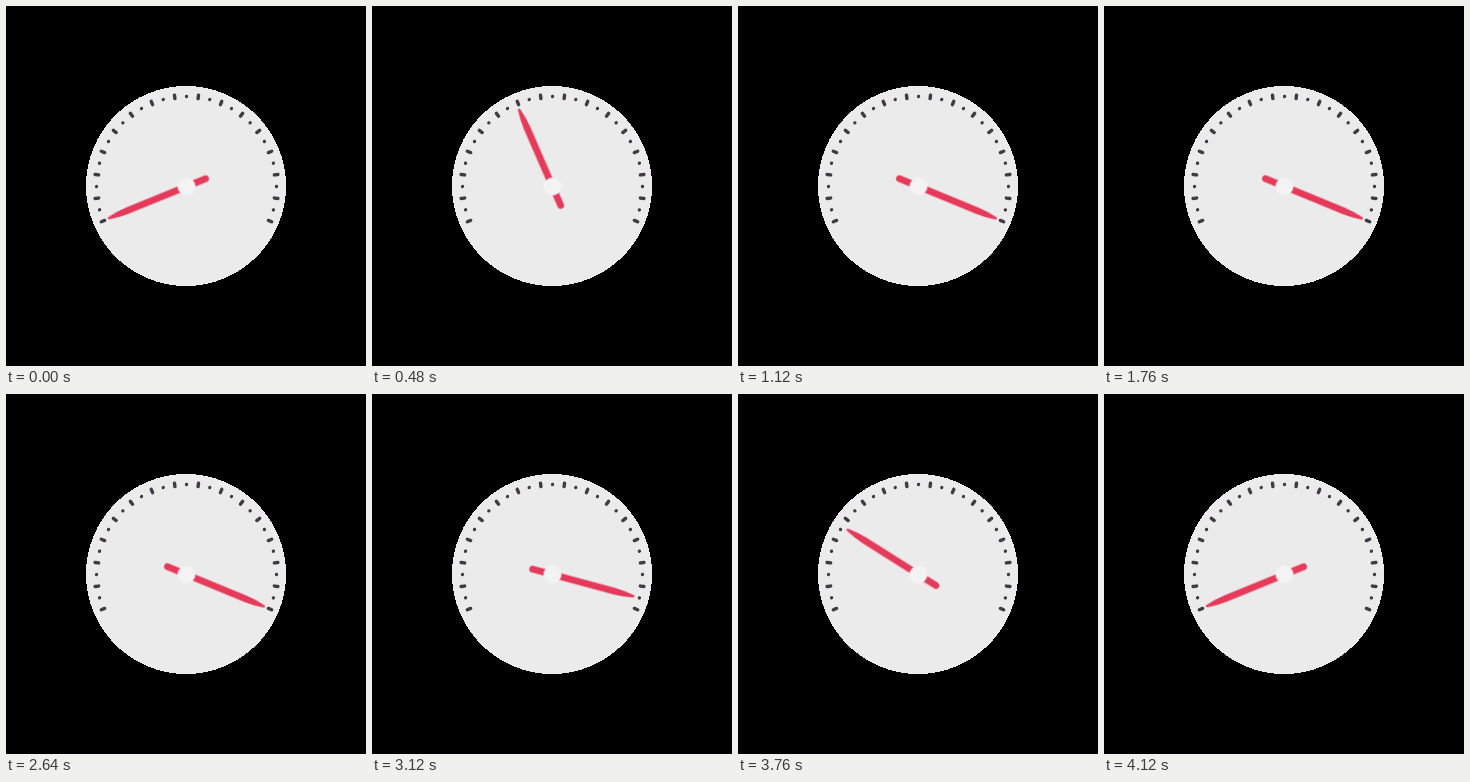
An HTML page without scripts for the animation above (5000 ms loop, 360 px wide and 360 px high).

```html
<!DOCTYPE html>
<html lang="en">
<head>
<meta charset="utf-8">
<title>Gauge</title>
<style>
  html, body {
    margin: 0;
    width: 100%;
    height: 100%;
    overflow: hidden;
    background: #000;
  }
  svg {
    display: block;
    width: 100%;
    height: 100%;
  }
  .dial {
    fill: #ebebeb;
    shape-rendering: crispEdges;
  }
  .marks {
    fill: none;
    stroke: #413c43;
    stroke-width: 3.4;
    stroke-linecap: round;
  }
  .needle {
    fill: #e53a5a;
    animation: sweep 5s cubic-bezier(.333, 0, .667, 1) infinite;
  }
  /* Sweep up, hold at full scale, then sweep back and rest. */
  @keyframes sweep {
    0%, 82.4%, 100% { transform: rotate(-112.2deg); }
    22.4%, 60% { transform: rotate(112.4deg); }
  }
</style>
</head>
<body>
<svg viewBox="-180 -180 360 360">
  <defs>
    <!-- Each group doubles the one before it: 16 ticks, 15 degrees apart. -->
    <path id="tick" d="M0 -92.2V-88.6"/>
    <g id="two"><use href="#tick"/><use href="#tick" transform="rotate(15)"/></g>
    <g id="four"><use href="#two"/><use href="#two" transform="rotate(30)"/></g>
    <g id="eight"><use href="#four"/><use href="#four" transform="rotate(60)"/></g>
  </defs>

  <circle class="dial" r="100"/>

  <g transform="translate(.5 .5)">
    <g class="marks">
      <use href="#eight" transform="rotate(-112.5)"/>
      <use href="#eight" transform="rotate(7.5)"/>
      <path d="M0 -90A90 90 0 1 1 -47.69 76.32" pathLength="212"
            stroke-dasharray="0 15" transform="rotate(-105)"/>
    </g>
    <path class="needle" d="M-3.4 20.5A3.4 3.4 0 0 0 3.4 20.5L3.4 -64Q3.2 -74 1.3 -83.6Q0 -86.2 -1.3 -83.6Q-3.2 -74 -3.4 -64Z"/>
    <circle r="9" fill="#f3f3f3"/>
  </g>
</svg>
</body>
</html>
```
